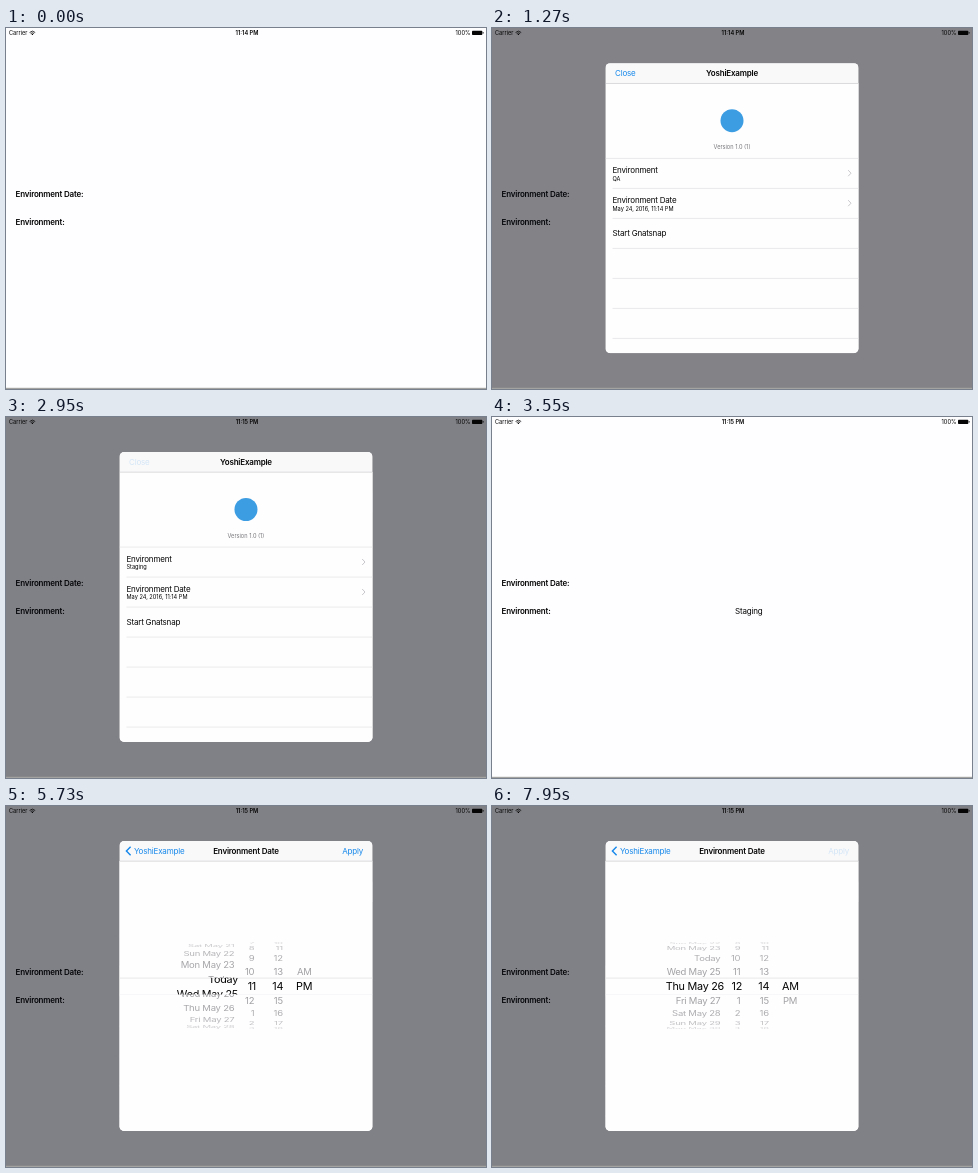
Write an HTML page that moves like this. It is 480 px wide and 361 px high and loops after 8 s.

```html
<!DOCTYPE html>
<html lang="en">
<head>
<meta charset="utf-8">
<title>Debug menu</title>
<style>
  html, body { margin: 0; width: 100%; height: 100%; overflow: hidden; background: #fefdff; }
  svg { display: block; width: 100vw; height: 100vh; }
  text { font-family: Inter, Roboto, sans-serif; white-space: pre; }
  .tight { letter-spacing: -.024em; }
</style>
</head>
<body>
<svg id="stage" viewBox="0 0 480 361">
  <defs>
    <clipPath id="sheetClip"><rect x="113.5" y="35" width="253" height="290" rx="4.7"/></clipPath>
    <clipPath id="bandClip"><rect x="113" y="172" width="254" height="16.4"/></clipPath>
    <clipPath id="rimClip"><path d="M113 136H367V172H113ZM113 188.4H367V224H113Z"/></clipPath>
  </defs>
</svg>
<script>
const LOOP = 8000;
const BLUE = '#1688ea', LINE = '#dcdcdf', INK = '#050505';
const LEFT = 113.5, WIDTH = 253;
const stage = document.getElementById('stage');

function add(parent, tag, attrs = {}) {
  const node = document.createElementNS('http://www.w3.org/2000/svg', tag);
  for (const key in attrs) node.setAttribute(key, attrs[key]);
  parent.append(node);
  return node;
}
const group = (parent, attrs) => add(parent, 'g', attrs);
const rect = (parent, x, y, width, height, fill, more) =>
  add(parent, 'rect', { x, y, width, height, fill, ...more });

function label(parent, string, x, y, size = 8, more = {}) {
  const node = add(parent, 'text', {
    x, y, 'font-size': size, fill: INK, class: size >= 8 ? 'tight' : '', ...more
  });
  node.textContent = string;
  return node;
}
const stroke = (parent, d, color, width) =>
  add(parent, 'path', { d, fill: 'none', stroke: color, 'stroke-width': width });

const bold = { 'font-weight': 600 };
const middle = { 'text-anchor': 'middle' };
const end = { 'text-anchor': 'end' };
const shift = (node, x, y = 0) => node.setAttribute('transform', `translate(${x} ${y})`);
const fade = (node, value) => node.setAttribute('opacity', value);

// Home screen
rect(stage, 0, 0, 480, 361, '#fefdff');
label(stage, 'Environment Date:', 9.5, 168.8, 8, bold);
label(stage, 'Environment:', 9.5, 196.8, 8, bold);
const homeValue = label(stage, 'Staging', 243, 196.8);
const dim = rect(stage, 0, 0, 480, 361, 'rgb(4,7,14)');
label(stage, 'Carrier', 3, 7, 5.63);
stroke(stage, 'M23.6 4.5Q26.4 1.7 29.2 4.5M24.7 5.6Q26.4 4 28.1 5.6', INK, .8);
add(stage, 'circle', { cx: 26.4, cy: 6.4, r: .7, fill: INK });
const clock = label(stage, '', 241, 7, 5.63, { ...bold, ...middle });
label(stage, '100%', 464.5, 7, 5.63, end);
rect(stage, 466, 2.7, 10.3, 4.2, INK, { rx: .7 });
rect(stage, 476.7, 4, .8, 1.6, INK);
rect(stage, 0, 359.8, 480, 1.2, '#a3a3a2');

// Sheet: pages below, navigation bar on top
const sheet = group(stage);
const clipped = group(sheet, { 'clip-path': 'url(#sheetClip)' });
rect(clipped, LEFT, 35, WIDTH, 290, '#fefeff');

function page() {
  const node = group(clipped);
  rect(node, LEFT, 55, WIDTH, 270, '#fefeff');
  return node;
}
function rule(parent, y, inset = 0) {
  rect(parent, LEFT + inset, y - .25, WIDTH - inset, .6, LINE);
}
const highlight = (parent, y, height) => rect(parent, LEFT, y, WIDTH, height, '#d9d9d9');

const menu = page();
add(menu, 'circle', { cx: 240, cy: 92.5, r: 11.5, fill: '#3d9de2' });
label(menu, 'Version 1.0 (1)', 240, 121.2, 5.63, { ...middle, fill: '#77777a' });
const envGlow = highlight(menu, 130, 30);
const dateGlow = highlight(menu, 160, 30);
rule(menu, 130);
for (let y = 160; y <= 310; y += 30) rule(menu, y, 7);
function menuRow(y, title, detail) {
  label(menu, title, 120.5, y + 14.8);
  stroke(menu, `M356.2 ${y + 12}l2.8 3l-2.8 3`, '#c2c2c7', .9);
  return label(menu, detail, 120.5, y + 22.4, 5.63);
}
const envDetail = menuRow(130, 'Environment', 'QA');
menuRow(160, 'Environment Date', 'May 24, 2016, 11:14 PM');
label(menu, 'Start Gnatsnap', 120.5, 207.9);

const envPage = page();
const ROW = 20.6;
const choiceGlow = highlight(envPage, 55 + ROW, ROW);
['Production', 'Staging', 'QA'].forEach((name, i) =>
  label(envPage, name, 120.5, 68.2 + i * ROW));
for (let y = 55 + ROW; y < 325; y += ROW) rule(envPage, y, 7);
const check = stroke(envPage, 'M351.5 65.5l2.3 2.4l4.6-5.2', BLUE, 1);

// Date picker
const datePage = page();
rect(datePage, LEFT, 171.7, WIDTH, .7, LINE);
rect(datePage, LEFT, 188.2, WIDTH, .4, '#ececef');
const rim = group(datePage, { 'clip-path': 'url(#rimClip)' });
const band = group(datePage, { 'clip-path': 'url(#bandClip)' });

function wheel(first, last, name, x, bigX, anchor) {
  const rows = [];
  for (let value = first; value <= last; value++) {
    const align = { 'text-anchor': anchor };
    rows.push({
      value,
      small: label(rim, name(value), 0, 3.4, 9.5, { ...align, fill: '#98989b' }),
      big: label(band, name(value), 0, 3.9, 10.8, align)
    });
  }
  return position => {
    for (const { value, small, big } of rows) {
      const angle = (value - position) * Math.PI / 9;
      const visible = Math.abs(angle) < 1.5;
      const squash = Math.max(.01, Math.cos(angle));
      const y = 180 + 43 * Math.sin(angle);
      small.setAttribute('visibility', visible ? 'inherit' : 'hidden');
      big.setAttribute('visibility', visible ? 'inherit' : 'hidden');
      small.setAttribute('transform', `translate(${x} ${y}) scale(1 ${squash})`);
      big.setAttribute('transform', `translate(${bigX} ${y}) scale(1 ${squash})`);
      fade(small, .25 + .7 * squash);
    }
  };
}
const DAYS = ['Sun', 'Mon', 'Tue', 'Wed', 'Thu', 'Fri', 'Sat'];
const dayName = day => day === 24 ? 'Today' : `${DAYS[(day - 15) % 7]} May ${day}`;
const setDay = wheel(19, 31, dayName, 228.4, 232, 'end');
const setHour = wheel(6, 17, hour => (hour - 1) % 12 + 1, 248.3, 250, 'end');
const setMinute = wheel(10, 18, String, 276.8, 277.2, 'end');
const setHalf = wheel(0, 1, half => ['AM', 'PM'][half], 291, 290, 'start');
setMinute(14);

// Navigation bar
rect(clipped, LEFT, 35, WIDTH, 20, '#f9f9fa');
rect(clipped, LEFT, 54.8, WIDTH, .6, '#c3c3c6');
const title = (string, parent = clipped) =>
  label(parent, string, 240, 47.8, 8, { ...bold, ...middle });
const menuTitle = title('YoshiExample');
const close = label(clipped, 'Close', 123, 47.8, 8, { fill: BLUE });
const envTitle = title('Environment');
const dateTitle = title('Environment Date');
const apply = label(clipped, 'Apply', 357, 47.8, 8, { ...end, fill: BLUE });
const back = group(clipped);
stroke(back, 'M124.6 40.7l-4.2 4.3l4.2 4.3', BLUE, 1.4);
const backText = label(back, 'YoshiExample', 128, 47.8, 8, { fill: BLUE });

// Timing
const clamp = v => Math.min(1, Math.max(0, v));
const within = (t, from, to) => t >= from && t < to;
const progress = (t, from, to) => clamp((t - from) / (to - from));
const smooth = p => p * p * (3 - 2 * p);
function spring(ms) {
  const w = Math.max(0, ms) * .01826;
  return 1 - (1 + w) * Math.exp(-w);
}

function slideTitle(node, k) {
  shift(node, (1 - k) * 110);
  fade(node, k * k);
}

function render(t) {
  clock.textContent = t < 1900 ? '11:14 PM' : '11:15 PM';
  homeValue.setAttribute('visibility', t >= 2300 ? 'visible' : 'hidden');

  const again = t >= 3550;
  const shown = again ? spring(t - 3550) : spring(t - 730) * (1 - spring(t - 2970));
  const dimmed = again ? shown : spring(t - 730) * (1 - progress(t, 2970, 3160));
  shift(sheet, 0, (1 - shown) * 327);
  sheet.setAttribute('visibility', within(t, 731, 3330) || t > 3551 ? 'visible' : 'hidden');
  fade(dim, dimmed * .5);

  const envK = spring(t - 1600) * (1 - spring(t - 2360));
  const dateK = spring(t - 4880);
  const k = Math.max(envK, dateK);
  shift(menu, -k * WIDTH * .3);
  shift(envPage, (1 - envK) * WIDTH);
  shift(datePage, (1 - dateK) * WIDTH);

  fade(envGlow, within(t, 1550, 2360) ? 1 : t >= 2360 ? 1 - progress(t, 2360, 2800) : 0);
  fade(dateGlow, t >= 4770 ? 1 : 0);
  fade(choiceGlow, t >= 2220 ? 1 : 0);
  shift(check, 0, t < 2300 ? 2 * ROW : ROW);
  envDetail.textContent = t < 2340 ? 'QA' : 'Staging';

  shift(menuTitle, -k * 87);
  fade(menuTitle, (1 - k) ** 2);
  fade(close, (1 - k) * (within(t, 2900, 3400) ? .16 : 1));
  slideTitle(envTitle, envK);
  slideTitle(dateTitle, dateK);
  shift(backText, (1 - k) * 87);
  fade(back, k * k);
  fade(apply, dateK * (t >= 7950 ? .16 : 1));

  setDay(24 + 2 * (1 - (1 - progress(t, 5600, 6480)) ** 1.6));
  setHour(11 + smooth(progress(t, 7060, 7450)));
  setHalf(1 - smooth(progress(t, 7250, 7590)));
}

const start = performance.now();
function tick() {
  render((performance.now() - start) % LOOP);
  requestAnimationFrame(tick);
}
tick();
</script>
</body>
</html>
```
